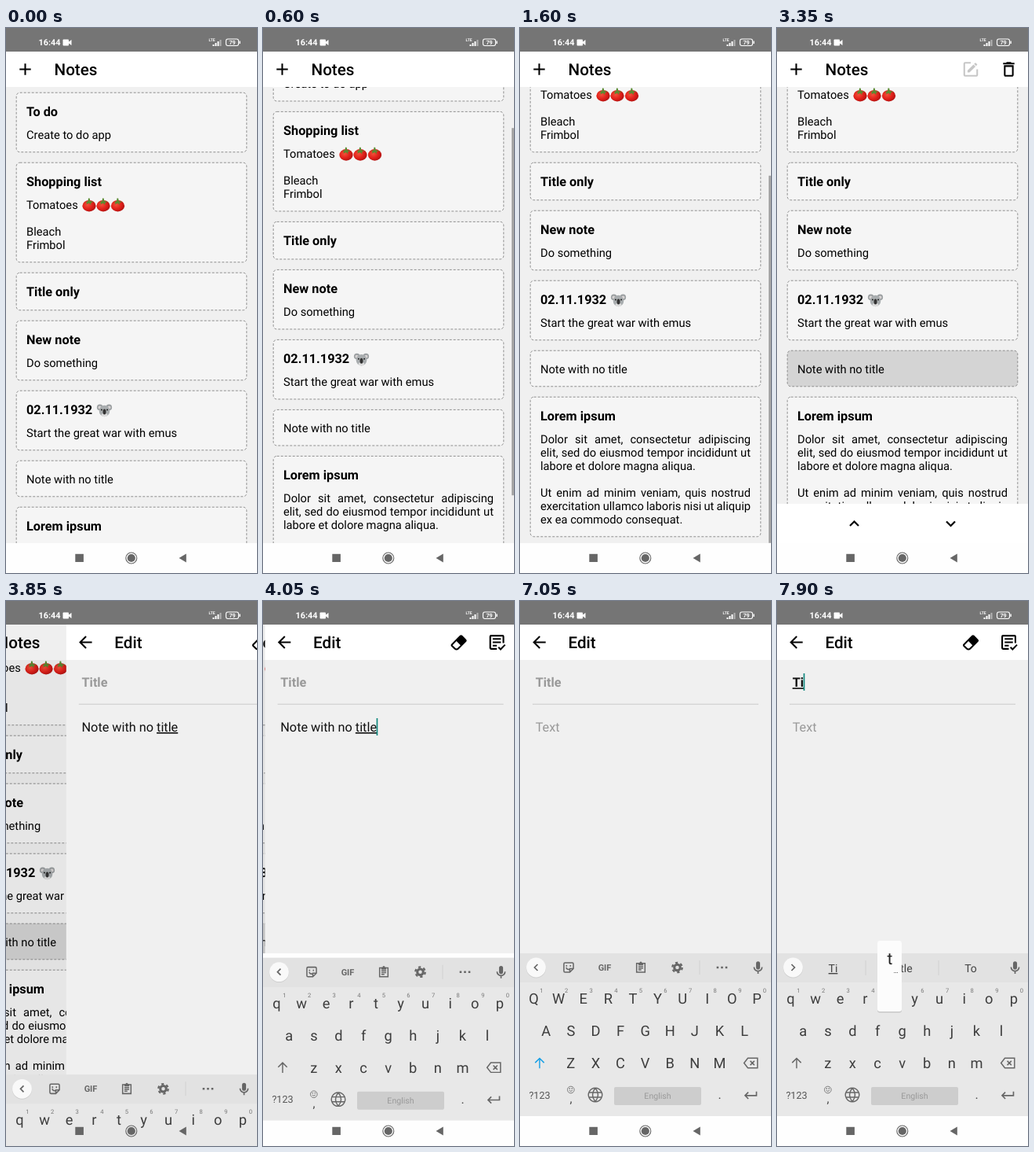
An HTML page that plays this animation: 320x693 px, repeating every 8000 ms.

```html
<!DOCTYPE html>
<html lang="en">
<head>
<meta charset="utf-8">
<title>Notes</title>
<style>
html, body { margin: 0; width: 100%; height: 100%; overflow: hidden; background: #fff; }
svg { display: block; width: 320px; height: 693px; }
text { font-family: Roboto, "Noto Sans", sans-serif; text-rendering: geometricPrecision; white-space: pre; }
.mid { text-anchor: middle; }
.line { fill: none; stroke: currentColor; }
</style>
</head>
<body>
<svg id="stage" viewBox="0 0 320 693" xmlns="http://www.w3.org/2000/svg"></svg>
<script>
const LOOP = 8000, STEP = 50, MAX_SCROLL = 140;
const stage = document.getElementById('stage');
const $ = id => document.getElementById(id);

// Markup helpers
const rect = (x, y, w, h, fill, more = '') =>
  `<rect x="${x}" y="${y}" width="${w}" height="${h}" fill="${fill}" ${more}/>`;
const text = (x, y, size, str, more = '') =>
  `<text x="${x}" y="${y}" font-size="${size}" ${more}>${str}</text>`;
const icon = (cx, cy, scale, body, more = '') =>
  `<g ${more}><g transform="translate(${cx} ${cy}) scale(${scale}) translate(-12 -12)">${body}</g></g>`;
const fill = d => `<path d="${d}" fill="currentColor"/>`;
const line = (d, w = 2) => `<path class="line" d="${d}" stroke-width="${w}"/>`;

const glyph = {
  plus: fill('M19 13h-6v6h-2v-6H5v-2h6V5h2v6h6z'),
  back: fill('M20 11H7.83l5.59-5.59L12 4l-8 8 8 8 1.41-1.41L7.83 13H20z'),
  pencil: line('M12 4H5a1 1 0 0 0-1 1V19a1 1 0 0 0 1 1H19a1 1 0 0 0 1-1V12') +
    fill('M17.3 4.2L16.1 5.4l2.5 2.5 1.2-1.2q.5-.5 0-1L18.25 4.2q-.5-.4-.95 0zM15.4 6.1L8 13.5V16h2.5l7.4-7.4z'),
  trash: fill('M6 19c0 1.1.9 2 2 2h8c1.1 0 2-.9 2-2V7H6zM8 9h8v10H8zM15.5 4l-1-1h-5l-1 1H5v2h14V4z'),
  eraser: fill('M16.24 3.56L21.2 8.5c.78.8.78 2.05 0 2.84L12 20.5c-1.56 1.56-4.1 1.56-5.66 0L2.8 17c-.78-.8-.78-2.05 0-2.84L13.4 3.56c.8-.78 2.06-.78 2.84 0zM4.22 15.6l3.54 3.5c.78.8 2.04.8 2.83 0l3.53-3.5-4.95-4.97z'),
  check: line('M12 20H5a1 1 0 0 1-1-1V5a1 1 0 0 1 1-1H19a1 1 0 0 1 1 1V13') +
    line('M7 8H17M7 12H17M7 16H12M14 18l2.6 2.6L22 15', 1.9),
  sticker: line('M6 4H18a2 2 0 0 1 2 2V14l-6 6H6a2 2 0 0 1-2-2V6a2 2 0 0 1 2-2M20 14H14V20M8 12q1 4 5 3') +
    fill('M7.5 8h2v2.5h-2zM14 8h2v2.5h-2z'),
  clipboard: line('M5 5H19V20H5zM8 10H16M8 13H16M8 16H13') + fill('M8 4h2a2 2 0 0 1 4 0h2v4H8z'),
  gear: '<circle class="line" cx="12" cy="12" r="5" stroke-width="4"/>' +
    '<circle class="line" cx="12" cy="12" r="8.2" stroke-width="3" stroke-dasharray="4.3 4.287"/>',
  dots: fill('M3 10.3h3.4v3.4H3zM10.3 10.3h3.4v3.4h-3.4zM17.6 10.3h3.4v3.4h-3.4z'),
  mic: fill('M12 3a3 3 0 0 1 3 3v6a3 3 0 0 1-6 0V6a3 3 0 0 1 3-3') + line('M6 11.5a6 6 0 0 0 12 0M12 17.5V21.5'),
  shift: line('M12 21V4M4.5 11.5L12 4l7.5 7.5', 1.9),
  backspace: line('M8 5H22V19H8L2.5 12zM11.5 9l6 6M17.5 9l-6 6', 1.7),
  globe: line('M12 2a10 10 0 1 0 .01 0M2.5 8.5H21.5M2.5 15.5H21.5M12 2q-8 10 0 20M12 2q8 10 0 20', 1.6),
  enter: line('M21 7V13H4M8.5 8L3.5 13l5 5', 2),
  smiley: line('M12 2a10 10 0 1 0 .01 0M7 14q5 5 10 0', 2) + fill('M7 7h3v3H7zM14 7h3v3h-3z')
};

const tomato = (x, y) => `<g transform="translate(${x} ${y})">
  <ellipse cy="1.2" rx="8.6" ry="7.3" fill="url(#red)"/>
  <path d="M-5-3.5L-1.5-5-1-8.5H.6L1.4-5 5.5-4 2-2.6 2.8.2-.3-2.2-3.6-.4-2.8-3z" fill="#5b8b32"/></g>`;
const koala = (x, y) => `<g transform="translate(${x} ${y})" fill="#9b9fa1">
  <circle cx="-5.8" cy="-3.6" r="3.8"/><circle cx="5.8" cy="-3.6" r="3.8"/>
  <circle cx="-6" cy="-3.4" r="2" fill="#d8d4d4"/><circle cx="6" cy="-3.4" r="2" fill="#d8d4d4"/>
  <ellipse cy="1" rx="6.8" ry="7.2" fill="#a9adaf"/><ellipse cy="6" rx="3.8" ry="2" fill="#ddd"/>
  <ellipse cy="2" rx="2" ry="3.5" fill="#333"/>
  <circle cx="-3.6" cy="-.4" r="1" fill="#222"/><circle cx="3.6" cy="-.4" r="1" fill="#222"/></g>`;

// Notes; lines starting with "=" are justified
const notes = [
  { title: 'To do', lines: ['Create to do app'] },
  { title: 'Shopping list', lines: ['Tomatoes', '', 'Bleach', 'Frimbol'],
    art: y => [106, 124, 142.5].map(x => tomato(x, y + 54)).join('') },
  { title: 'Title only', lines: [] },
  { title: 'New note', lines: ['Do something'] },
  { title: '02.11.1932', lines: ['Start the great war with emus'], art: y => koala(125.5, y + 25) },
  { lines: ['Note with no title'], id: 'picked' },
  { title: 'Lorem ipsum', lines: ['=Dolor sit amet, consectetur adipiscing', '=elit, sed do eiusmod tempor incididunt ut',
    'labore et dolore magna aliqua.', '', '=Ut enim ad minim veniam, quis nostrud',
    '=exercitation ullamco laboris nisi ut aliquip', 'ex ea commodo consequat.'] }
];

function listMarkup() {
  let y = 82;
  return notes.map(({ title, lines, art, id }) => {
    const first = title ? 59 : 29;
    const height = !title ? 46 : lines.length ? 59 + 17 * lines.length : 48;
    const rows = lines.map((s, i) => text(26, y + first + 17 * i, 14.7, s.replace('=', ''), s[0] === '=' ? 'class="just"' : ''));
    const out = rect(13.2, y + .2, 293.6, height - .4, '#f5f5f5',
      `rx="4.5" stroke="#858585" stroke-width=".9" stroke-dasharray="3 2" ${id ? `id="${id}"` : ''}`) +
      (title ? text(26, y + 30, 16.3, title, 'font-weight="700"') : '') + rows.join('') + (art ? art(y) : '');
    y += height + 13;
    return out;
  }).join('');
}

const header = (glyphName, label) => rect(0, 30, 320, 45, '#fff') +
  icon(24.5, 52.5, 1.03, glyph[glyphName]) + text(61.5, 60.3, 20.6, label, 'font-weight="500"');

const keyRows = [['qwertyuiop', 17.5, 511.8], ['asdfghjkl', 33.3, 553], ['zxcvbnm', 64.8, 594]];
const keyX = (row, i) => keyRows[row][1] + 31.6 * i;

function keyboardMarkup() {
  const letters = keyRows.map(([keys, , y], r) => [...keys].map((k, i) =>
    text(keyX(r, i), y, 18.3, k, 'class="mid key" fill="#3d3d3d"') +
    (r ? '' : text(keyX(0, i) + 10, 498, 7.6, (i + 1) % 10, 'class="mid" fill="#777"'))).join('')).join('');
  const tools = [['sticker', 62], ['clipboard', 154], ['gear', 200.5], ['dots', 257.5]]
    .map(([g, x]) => icon(x, 466, .76, glyph[g])).join('');
  return rect(0, 448, 320, 207, '#e8e8e8') + rect(0, 448, 320, 37, '#e2e2e2') + rect(0, 655, 320, 38, '#fefefe') +
    `<circle cx="20.5" cy="466.8" r="12.6" fill="#cfcfcf"/><circle cx="20.5" cy="466" r="12.4" fill="#f9f9f9"/>
    <g color="#666"><path id="arrow" class="line" stroke="#333" stroke-width="1.7"/>
    <g id="tools">${tools}${text(108, 470, 11, 'GIF', 'class="mid" font-weight="700" fill="#666"')}
    ${rect(228.5, 457, 1, 18, '#d0d0d0')}</g>
    <g id="hints" fill="#444">${[71.5, 159, 247].map(x => text(x, 472, 14, '', 'class="mid hint"')).join('')}
    ${rect(112.5, 457, 1, 19, '#d0d0d0')}${rect(205.5, 457, 1, 19, '#d0d0d0')}</g>
    ${icon(303.5, 466, .85, glyph.mic)}${letters}
    ${icon(25, 587.5, .76, glyph.shift, 'id="shift"')}${icon(294, 587.5, .88, glyph.backspace)}
    ${text(25, 632.5, 12.6, '?123', 'class="mid" fill="#555"')}
    ${icon(64.8, 621.5, .43, glyph.smiley)}${text(65, 638, 15, ',', 'class="mid" fill="#444"')}
    ${icon(96, 628, .87, glyph.globe)}${icon(294, 628, .83, glyph.enter)}
    ${text(254.5, 633, 16, '.', 'class="mid" fill="#444"')}</g>
    ${rect(120, 618, 111, 23, '#cdcdcd', 'rx="2"')}${text(175.5, 633.3, 10.6, 'English', 'class="mid" fill="#999"')}
    <g id="popup">${rect(0, 433, 31, 90.5, '#bbb', 'rx="3" opacity=".7"')}${rect(0, 432, 31, 90, '#fcfcfc', 'rx="3"')}
    ${text(16, 462, 21, '', 'class="mid" id="popKey" fill="#222"')}${text(23.5, 472.5, 9, '…', 'class="mid" fill="#222"')}</g>`;
}

const statusBar = rect(0, 0, 320, 30, '#757575') + `<g fill="#fff" color="#fff">
  ${text(41.5, 22.3, 10.8, '16:44', 'font-weight="700"')}
  ${rect(72.5, 14.5, 7.5, 8, '#fff', 'rx="1"')}<path d="M80 17.5l3.5-2.5v7L80 19.5z"/>
  ${text(258.5, 16.5, 5, 'LTE', 'font-weight="700"')}
  ${[0, 1, 2, 3].map(i => rect(263.5 + i * 3, 21 - i * 2, 2, 2 + i * 2, '#fff', i > 2 ? 'opacity=".45"' : '')).join('')}
  <rect class="line" x="280.5" y="14" width="16" height="8.5" rx="2.4" stroke-width="1.1"/>
  ${rect(297.4, 16.5, 1.4, 3.5, '#fff')}${text(288.5, 21, 7.2, '79', 'class="mid" font-weight="700"')}</g>`;

const navIcons = `<g fill="#666">${rect(88.3, 668.8, 10.6, 10.2, '#666')}
  <circle cx="159.8" cy="674" r="5.1"/><circle cx="159.8" cy="674" r="7" fill="none" stroke="#666" stroke-width="1.1"/>
  <path d="M220.5 674L229.8 668.6V679.4z"/></g>`;

stage.innerHTML = `<defs>
  <radialGradient id="red" cx=".38" cy=".4" r=".7"><stop offset="0" stop-color="#f4503a"/><stop offset=".55" stop-color="#e0201a"/><stop offset="1" stop-color="#a80f0f"/></radialGradient>
  <clipPath id="view"><rect x="0" y="75" width="320" height="580"/></clipPath></defs>
  ${rect(0, 0, 320, 693, '#fefefe')}
  <g id="listScreen">${rect(0, 75, 320, 580, '#f0f0f0')}
    <g clip-path="url(#view)"><g id="list">${listMarkup()}</g></g>
    ${rect(317, 75, 3, 467, '#a6a6a6', 'id="thumb"')}${header('plus', 'Notes')}
    <g id="selection">${icon(247, 52.5, 1.03, glyph.pencil, 'id="pencil"')}${icon(295.5, 52.5, 1.03, glyph.trash)}
      ${rect(0, 605, 320, 50, '#fff')}${line('M93 633l5.5-5.5 5.5 5.5M216 627.5l5.5 5.5 5.5-5.5', 2.2)}</g></g>
  ${rect(0, 30, 320, 625, '#000', 'id="dim"')}
  <g id="editScreen">${rect(0, 75, 320, 580, '#f0f0f0')}${header('back', 'Edit')}
    <g id="actions">${icon(247, 52.5, 1.03, glyph.eraser, 'id="eraser"')}${icon(295.5, 52.5, 1.05, glyph.check)}</g>
    ${text(19.7, 109.3, 16.25, '', 'id="title" font-weight="700"')}${rect(16, 130.7, 288, 1, '#cbcbcb')}
    ${text(19.7, 166, 16.25, '', 'id="body"')}${rect(0, 0, 1.7, 22, '#12897f', 'id="caret"')}</g>
  ${rect(0, 448, 320, 207, '#fefefe', 'id="gap"')}
  <g id="keyboard">${keyboardMarkup()}</g>${navIcons}${statusBar}`;

document.querySelectorAll('.just').forEach(el => {
  const gaps = el.textContent.split(' ').length - 1;
  el.style.wordSpacing = (268 - el.getComputedTextLength()) / gaps + 'px';
});

const show = (id, on) => { $(id).style.display = on ? '' : 'none'; };
const move = (id, x, y) => $(id).setAttribute('transform', `translate(${x} ${y})`);
const within = (t, a, b) => t >= a && t < b;
const progress = (t, a, b) => Math.min(1, Math.max(0, (t - a) / (b - a)));
const remaining = (t, a, b, power) => (1 - progress(t, a, b)) ** power;
const mix = (a, b, p) => Math.round(a + (b - a) * p);

function drawList(t, slide) {
  const scroll = t < 500 ? 0 : MAX_SCROLL * (1 - remaining(t, 450, 1100, 2.37));
  move('list', 0, -scroll);
  show('thumb', within(t, 500, 1800));
  move('thumb', 0, scroll * 580 / 720);
  $('thumb').setAttribute('opacity', remaining(t, 1600, 1800, 1));
  const tone = mix(245, 212, t < 2000 ? 0 : progress(t, 1950, 2150));
  $('picked').setAttribute('fill', `rgb(${tone},${tone},${tone})`);
  show('selection', t >= 2000);
  $('pencil').setAttribute('opacity', within(t, 3350, 3700) ? .22 : 1);
  move('listScreen', -96 * (1 - slide), 0);
}

function setField(id, value, hint, underlineFrom) {
  const el = $(id);
  el.setAttribute('fill', value ? '#111' : '#999');
  el.innerHTML = value
    ? value.slice(0, underlineFrom) + `<tspan text-decoration="underline">${value.slice(underlineFrom)}</tspan>` : hint;
  return value ? el.getComputedTextLength() : 0;
}

function drawEdit(t, slide) {
  move('editScreen', 320 * slide, 0);
  const bodyWidth = setField('body', t < 5450 ? 'Note with no title' : '', 'Text', 13);
  const titleWidth = setField('title', t < 7350 ? '' : t < 7700 ? 'T' : 'Ti', 'Title', 0);
  const inTitle = t >= 6450;
  move('caret', 19.3 + (inTitle ? titleWidth : bodyWidth), inTitle ? 92 : 149);
  show('caret', t >= 3900 && !within(t, 4750, 5250) && !within(t, 5950, 6450) && !within(t, 7050, 7350));
  show('actions', !within(t, 5450, 7550));
  $('eraser').setAttribute('opacity', within(t, 5150, 5450) ? .22 : 1);
}

function drawKeyboard(t) {
  move('keyboard', 0, 245 * remaining(t, 3800, 4150, 3));
  show('gap', t >= 3900);
  const caps = within(t, 5500, 7400);
  document.querySelectorAll('.key').forEach(el => {
    el.textContent = caps ? el.textContent.toUpperCase() : el.textContent.toLowerCase();
  });
  $('shift').setAttribute('color', caps && !within(t, 6450, 6550) ? '#18a0e6' : '#666');

  const hinting = within(t, 4300, 5500) || t >= 7400;
  show('tools', !hinting);
  show('hints', hinting);
  $('arrow').setAttribute('d', hinting ? 'M18.5 462l4 4-4 4' : 'M22.5 462l-4 4 4 4');
  const words = t < 7000 ? ['titled', 'title', 'titles'] : t < 7700 ? ['T', 'The', 'To'] : ['Ti', 'Title', 'To'];
  document.querySelectorAll('.hint').forEach((el, i) => {
    el.textContent = words[i];
    el.setAttribute('text-decoration', i || t < 7000 ? 'none' : 'underline');
  });

  const pressed = within(t, 7350, 7550) ? 'T' : within(t, 7650, 7900) ? 'i' : t >= 7900 ? 't' : '';
  show('popup', pressed);
  if (pressed) {
    $('popKey').textContent = pressed;
    move('popup', keyX(0, keyRows[0][0].indexOf(pressed.toLowerCase())) - 15.9, 0);
  }
}

function render(t) {
  const slide = t < 3700 ? 1 : remaining(t, 3700, 4200, 4);
  const editing = t >= 3700;
  drawList(t, slide);
  $('dim').setAttribute('opacity', .08 * (1 - slide));
  ['editScreen', 'keyboard', 'gap'].forEach(id => show(id, editing));
  if (editing) {
    drawEdit(t, slide);
    drawKeyboard(t);
  }
}

const start = performance.now();
function tick() {
  const t = (performance.now() - start) % LOOP;
  render(Math.floor(t / STEP) * STEP);
  requestAnimationFrame(tick);
}
tick();
</script>
</body>
</html>
```
